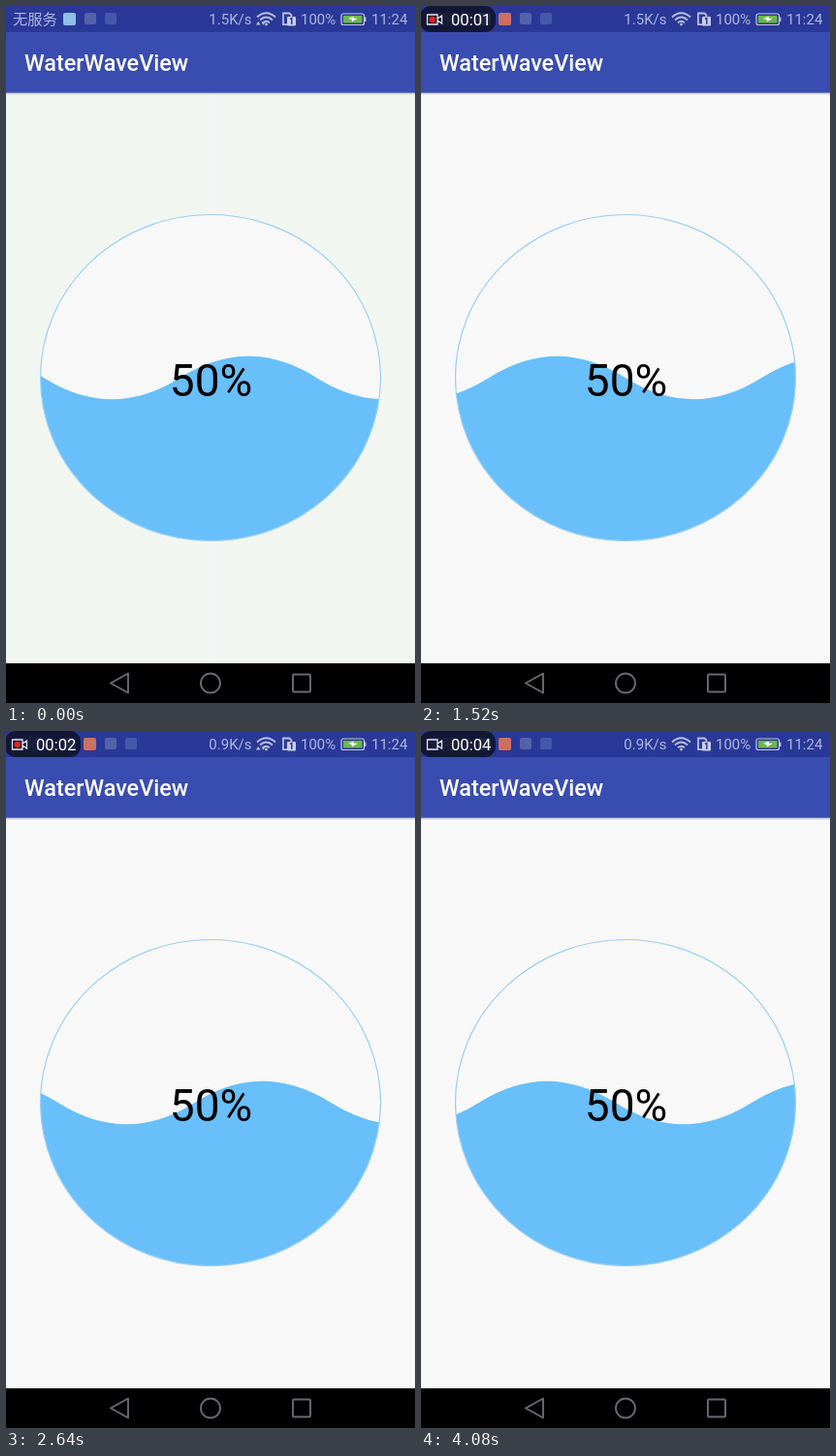
Animation of 422x720 px, one loop 4160 ms. Source, as an HTML page:

```html
<!DOCTYPE html>
<html lang="en">
<head>
<meta charset="utf-8">
<title>WaterWaveView</title>
<style>
  html, body { margin: 0; height: 100%; overflow: hidden; background: #000; }
  svg { display: block; width: 100vw; height: 100vh; font-family: Roboto, sans-serif; }
  .status { font-size: 15px; fill: #b0b6dc; }
  .line { fill: none; stroke: #b9bfe2; stroke-width: 1.8; }
  .nav { fill: none; stroke: #6d6873; stroke-width: 1.9; stroke-linejoin: round; }
</style>
</head>
<body>
<svg viewBox="0 0 422 720">
  <defs>
    <clipPath id="bowl"><ellipse cx="211" cy="384" rx="175.5" ry="168.5"/></clipPath>
    <linearGradient id="shade" x2="0" y2="1">
      <stop stop-color="#8f94a8"/>
      <stop offset="1" stop-color="#f7f8f7" stop-opacity="0"/>
    </linearGradient>
  </defs>

  <rect id="page" width="422" height="680" fill="#f7f8f7"/>
  <path id="seam" d="M210 90h7v588h-7z" fill="#f5f5f7"/>
  <rect y="89" width="422" height="4" fill="url(#shade)"/>
  <rect y="26" width="422" height="63.5" fill="#394cb0"/>
  <rect width="422" height="27" fill="#2a3998"/>
  <text x="19" y="67" font-size="23.4" font-weight="500" fill="#fff">WaterWaveView</text>

  <ellipse cx="211" cy="384" rx="175.5" ry="168.5" fill="#f7f8f7"/>
  <g clip-path="url(#bowl)"><path id="wave" fill="#68bff9"/></g>
  <ellipse cx="211" cy="384" rx="175.5" ry="168.5" fill="none" stroke="#9ccff3" stroke-width="1.2"/>
  <text x="211.5" y="402.5" font-size="46" text-anchor="middle">50%</text>

  <text class="status" x="7" y="19" style="font:15.3px 'Noto Sans CJK SC','Noto Sans CJK',sans-serif">无服务</text>
  <rect x="59" y="7" width="13" height="13" rx="2" fill="#8fbfe8"/>
  <rect id="alert" x="80" y="7" width="13" height="13" rx="2" fill="#cf6e63"/>
  <g id="dim">
    <rect x="81" y="7" width="12" height="12" rx="2" fill="#5363ab"/>
    <rect x="102" y="7" width="12" height="12" rx="2" fill="#4658a8"/>
  </g>

  <text id="speed" class="status" x="253.5" y="19" text-anchor="end"></text>
  <path class="line" d="M259 11.5q9.5-8.5 19 0M262 14.5q6.5-6 13 0M265 17.4q3.5-3.2 7 0"/>
  <circle cx="268.5" cy="19" r="1.4" fill="#b9bfe2"/>
  <path id="traffic" d="M257 14h5v7h-5zM259 18h5v3h-5z" fill="#2a3998"/>
  <path id="arrows" d="M258 19.5l2.3-3.5 2.3 3.5zM263.5 16.5h4l-2 3.2z" fill="#b9bfe2"/>
  <path class="line" d="M286 7.5h6.5l2 2v9.7H286z"/>
  <rect x="290" y="11" width="9" height="9.5" rx="1" fill="#c9cdea"/>
  <path d="M293 13.4l1.8-1v6.4" fill="none" stroke="#2a3998" stroke-width="1.5"/>
  <text class="status" x="304" y="19">100%</text>
  <rect x="346" y="8" width="23.5" height="11.5" rx="2" fill="#2a3998" stroke="#c2c7e4" stroke-width="1.2"/>
  <rect x="348" y="10" width="19.5" height="7.5" fill="#6bb74b"/>
  <path d="M370.5 11.5v4.5" stroke="#c2c7e4" stroke-width="1.8"/>
  <path d="M353 13l5.500-2.200.5 2h4l-6 3.400-.5-2.200z" fill="#fff"/>
  <text class="status" x="377" y="19">11:24</text>

  <g id="recorder">
    <rect x="-1" width="78" height="27" rx="11" fill="#11132b" fill-opacity=".88"/>
    <path d="M6.500 9h10.500v10H6.500zM17 13l4.500-3v8L17 15z" fill="none" stroke="#e6e6ee" stroke-width="1.3"/>
    <circle id="dot" cx="11.700" cy="14" r="3.200" fill="#e5251f"/>
    <text id="timer" x="31" y="20" font-size="16.600" fill="#fff"></text>
  </g>

  <rect y="679" width="422" height="41"/>
  <path class="nav" d="M108 699.500L126 689.500V709.500Z"/>
  <circle class="nav" cx="211" cy="699.500" r="10"/>
  <rect class="nav" x="296" y="690.500" width="18" height="18" rx="1"/>
</svg>
<script>
  const LOOP = 4160, STEP = 80, LENGTH = 281.4;
  const $ = id => document.getElementById(id);
  const show = (id, on) => $(id).setAttribute('visibility', on ? 'visible' : 'hidden');

  const pace = [[0, 250], [480, 300], [1040, 381.4], [2000, 462.4],
                [2640, 546.4], [3440, 628.4], [4080, 692.8]];

  function crestAt(t) {
    const i = Math.max(1, pace.findIndex(p => t <= p[0]));
    const [t0, x0] = pace[i - 1], [t1, x1] = pace[i];
    return (x0 + (x1 - x0) * (t - t0) / (t1 - t0)) % LENGTH;
  }

  // Parabolic arcs; one crest lies at x = 0
  const half = LENGTH / 2, left = -half / 2 - 2 * LENGTH;
  $('wave').setAttribute('d',
    `M${left} 384q${half / 2} -44.500 ${half} 0${`t${half} 0`.repeat(7)}V560H${left}z`);

  function draw(now) {
    const t = Math.floor(now % LOOP / STEP) * STEP;
    const first = t < STEP;
    const busy = t < 240 || t >= 2560 && t < 2880;
    $('wave').setAttribute('transform', `translate(${crestAt(t)})`);
    $('page').setAttribute('fill', first ? '#f1f6f0' : '#f7f8f7');
    $('dim').setAttribute('transform', `translate(${first ? 0 : 21})`);
    $('speed').textContent = t < 2320 ? '1.5K/s' : '0.9K/s';
    $('timer').textContent = '00:0' + Math.floor(t / 1000);
    show('seam', first);
    show('alert', !first);
    show('recorder', !first);
    show('dot', t > 1000 && t % 1000 >= 400);
    show('traffic', busy);
    show('arrows', busy);
    requestAnimationFrame(() => draw(performance.now()));
  }
  draw(0);
</script>
</body>
</html>
```
